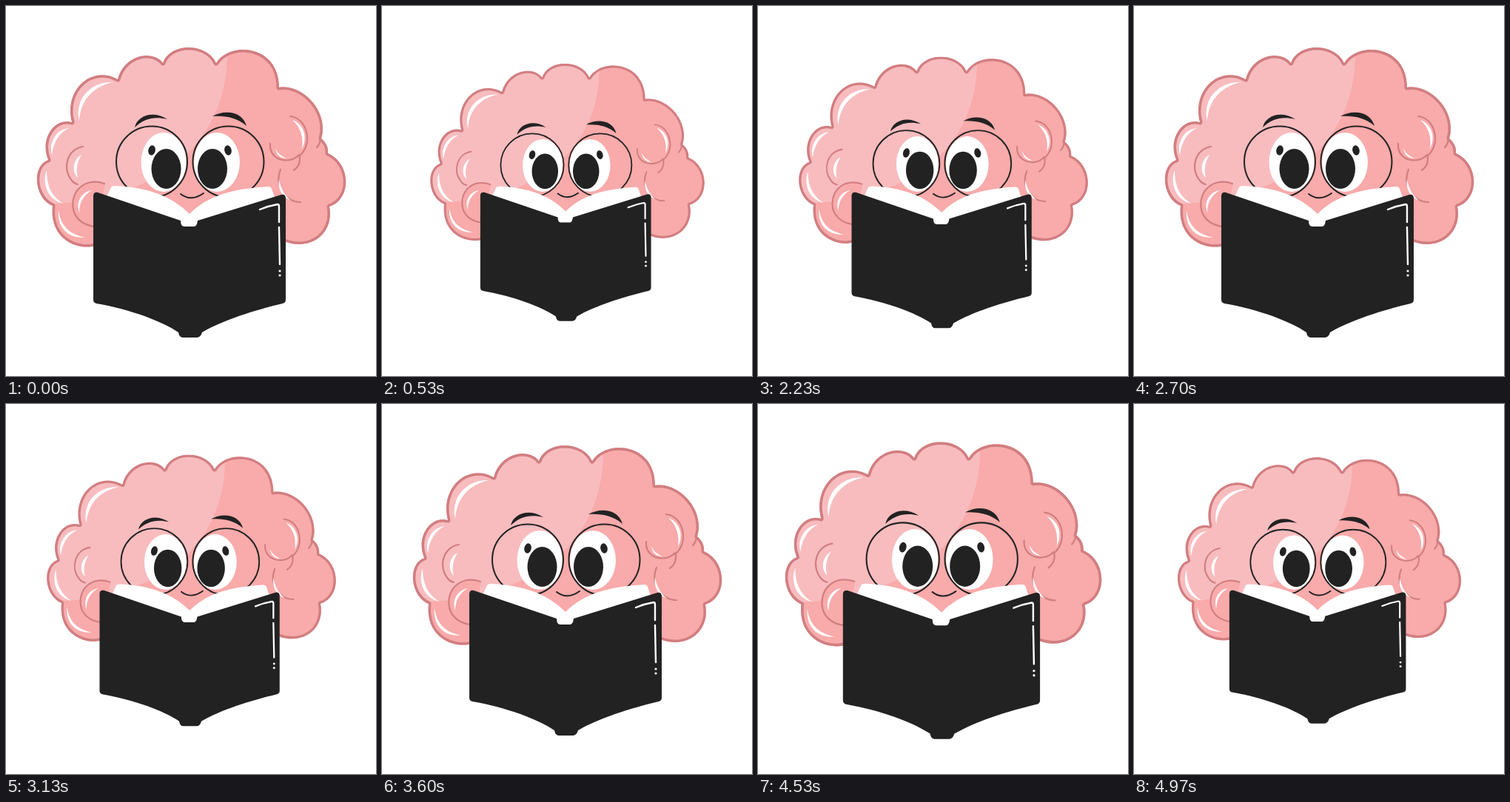
An HTML page that plays this animation: 500x500 px, repeating every 5.01 s.

```html
<!DOCTYPE html>
<html lang="en">
<head>
<meta charset="utf-8">
<title>Reading brain</title>
<style>
  html, body { margin: 0; width: 100%; height: 100%; overflow: hidden; background: #fff; }
  svg { display: block; width: 100vw; height: 100vh; }
  .line { fill: none; stroke: #d17e81; stroke-linecap: round; stroke-linejoin: round; }
  .edge { stroke-width: 7; }
  .fold { stroke-width: 2.2; }
  .shine { fill: #fff; }
  .ink { fill: #232222; }
  .pen { fill: none; stroke: #232222; stroke-width: 2; stroke-linecap: round; }
  .glint { fill: none; stroke: #fff; stroke-width: 2.4; stroke-linecap: round; stroke-linejoin: round; }
</style>
</head>
<body>
<svg viewBox="0 0 500 500">
  <defs>
    <path id="brain" d="M121 324 C97 331 58 315 63 270 C38 260 34 216 57 208 C45 179 66 150 89 157
      C78 115 114 79 151 99 C160 65 199 59 212 77 C222 49 271 49 284 77
      C302 47 369 52 369 110 C402 105 437 144 426 179 C432 184 436 191 435 199
      C467 213 467 262 437 271 C444 307 412 332 376 318 L376 340 L121 340 Z"/>
    <clipPath id="inside"><use href="#brain"/></clipPath>
  </defs>
  <g id="figure">
    <g clip-path="url(#inside)">
      <use href="#brain" fill="#f8bcbf"/>
      <path fill="#f9aaaa" d="M299 50 L299 70 C296 190 200 268 40 268 L40 345 L480 345 L480 40 Z"/>
      <path fill="#f9aaaa" d="M134 241 C105 230 84 253 92 279 Q99 295 121 298 Z"/>
      <use href="#brain" class="line edge"/>
    </g>

    <g class="line fold">
      <path d="M104 190 C83 193 75 219 89 236 Q92 240 97 241"/>
      <path d="M133 240 C105 230 84 253 92 279 Q99 295 119 298"/>
      <path d="M384 149 C407 151 416 187 396 203"/>
      <path d="M357 186 C355 209 384 215 396 201"/>
      <path d="M397 204 Q398 216 389 222"/>
      <path d="M371 221 C362 244 379 266 398 265"/>
      <path d="M425 180 Q424 187 420 191"/>
    </g>

    <g class="shine">
      <path d="M99 155 C92 126 115 101 145 103 C119 108 101 126 99 155 Z"/>
      <path d="M62 201 C57 184 69 166 85 165 C72 171 64 184 62 201 Z"/>
      <path d="M55 222 C48 241 57 262 77 267 C62 257 55 244 55 222 Z"/>
      <path d="M71 276 C69 299 83 314 107 313 C85 308 74 297 71 276 Z"/>
      <path d="M97 232 C88 223 91 207 102 201 C96 211 94 221 97 232 Z"/>
      <path d="M99 279 C94 265 102 251 116 249 C104 256 99 266 99 279 Z"/>
      <path d="M387 154 C403 160 408 178 400 193 C402 178 399 165 387 154 Z"/>
      <path d="M364 192 C365 201 371 206 379 206 C372 203 367 199 364 192 Z"/>
      <path d="M369 234 C367 248 373 258 385 263 C376 255 371 246 369 234 Z"/>
    </g>

    <g fill="#fff">
      <ellipse cx="213" cy="211" rx="30.5" ry="40"/>
      <ellipse cx="285" cy="211" rx="31" ry="40"/>
    </g>
    <g class="ink">
      <ellipse cx="216.5" cy="220" rx="20" ry="27"/>
      <ellipse cx="279" cy="220" rx="20" ry="27"/>
      <ellipse cx="197" cy="195" rx="4.7" ry="6.8" transform="rotate(14 197 195)"/>
      <ellipse cx="300" cy="195" rx="4.7" ry="6.8" transform="rotate(-14 300 195)"/>
      <path d="M174 164 C177 149 198 140 218 153 C200 149 187 152 174 164 Z"/>
      <path d="M279 149 C294 140 319 141 325 162 C312 151 297 148 279 149 Z"/>
    </g>
    <g class="pen">
      <circle cx="197" cy="210.5" r="48"/>
      <circle cx="300.5" cy="210.5" r="48"/>
      <path d="M236 254 Q250 265 267 253"/>
    </g>

    <path fill="#fff" d="M142 245 Q143 243 148 243 C190 245 223 256 248 281 C273 256 306 247 354 244 Q358 244 359 247 L364 262 L259 300 L235 300 L136 258 Z"/>
    <path class="ink" d="M118 257 Q118 251 124 252 L236 290 Q236 298 241 298 L254 298 Q258 298 259 290
      L372 255 Q378 254 378 260 L378 397 Q378 401 374 402 C336 411 292 425 265 441
      Q263 448 258 448 L239 448 Q234 448 233 441 C211 426 168 410 122 402 Q118 401 118 397 Z"/>
    <path class="glint" d="M343 275 Q355 270 367 268 Q369 268 369 271 L369 292 M369 299 L370 349"/>
    <circle class="shine" cx="370" cy="358" r="1.6"/>
    <circle class="shine" cx="370" cy="364" r="1.6"/>
  </g>
</svg>
<script>
  const LOOP = 5010, FPS = 30, BEAT = 27, PEAK = 5;
  const LOW = 0.866, SWING = 0.268;
  const figure = document.getElementById('figure');

  // Sharp at the largest size, soft at the smallest.
  function scaleAt(step) {
    const phase = (step - PEAK + BEAT) % BEAT;
    return LOW + SWING * Math.abs(1 - 2 * phase / BEAT) ** 1.5;
  }

  function draw(now) {
    const t = Math.floor((now % LOOP) / 10) * 10 + 5;
    const s = scaleAt(Math.min(149, Math.floor(t * FPS / 1000)));
    figure.setAttribute('transform', `translate(250 250) scale(${s.toFixed(4)}) translate(-250 -250)`);
  }

  const start = performance.now();
  function tick() {
    draw(performance.now() - start);
    requestAnimationFrame(tick);
  }
  tick();
</script>
</body>
</html>
```
